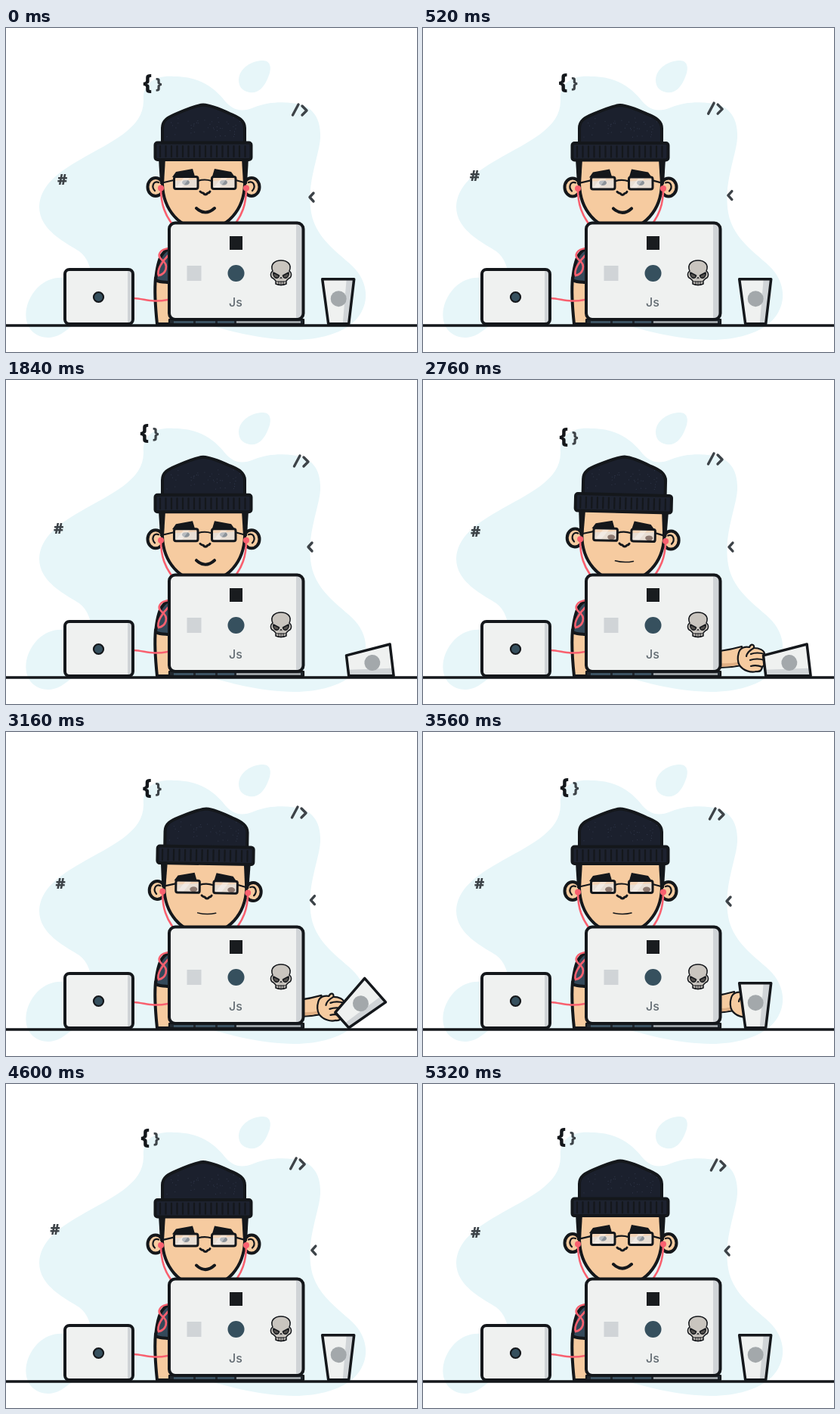
Animation of 544 by 428 pixels, one loop 5360 ms. Source, as an HTML page:

```html
<!DOCTYPE html>
<html lang="en">
<head>
<meta charset="utf-8">
<title>Coder at a desk</title>
<style>
  html, body { margin: 0; width: 100%; height: 100%; overflow: hidden; background: #fff; }
  svg { display: block; width: 544px; height: 428px; }
  text { font: 800 20px "Open Sans", "Noto Sans", sans-serif; fill: #3d4348; }
  .ink { stroke: #14171b; stroke-width: 4; stroke-linejoin: round; stroke-linecap: round; }
  .line { fill: none; }
  .thin { stroke-width: 2.2; }
  .cord { fill: none; stroke: #f9606f; stroke-width: 2.6; stroke-linecap: round; }
  .skin { fill: #f6cba0; }
  .metal { fill: #eff1f0; }
  .shade { fill: #d0d4d7; }
  .teal { fill: #36505e; }
  .mark { fill: none; stroke: #3d4348; stroke-width: 3.4; stroke-linecap: round; stroke-linejoin: round; }
</style>
</head>
<body>
<svg viewBox="0 0 544 428">
  <g fill="#e7f6f9">
    <path d="M182 96C180 72 199 62 222 64C256 64 274 78 287 93C299 109 311 112 328 105C350 96 375 97 393 102C416 111 419 137 414 159C407 190 399 213 404 244C410 278 440 297 458 314C479 334 482 361 466 382C449 404 412 412 382 412C336 411 304 402 270 393H106C119 342 116 309 97 295C76 282 44 266 44 236C45 208 70 190 98 174C139 150 182 133 182 96Z"/>
    <path d="M78 330C52 327 32 347 27 371C23 394 37 409 56 409C77 408 79 395 100 388L108 340Z"/>
    <path d="M308 68C309 53 325 43 340 43C351 43 352 54 347 65C342 78 334 87 322 85C312 83 308 77 308 68Z"/>
  </g>

  <g id="braces">
    <text x="181" y="81" style="font-size:28px;fill:#14171b">{</text>
    <text x="198" y="80">}</text>
  </g>
  <text id="hash" x="68" y="207">#</text>
  <path id="tag" class="mark" d="M379.500 115L387 101M392 103L398 109L392 115"/>
  <path id="angle" class="mark" d="M407 218L402 223.500L407 229"/>

  <!-- body -->
  <path class="ink skin" d="M198 330C196 350 198 372 200 391H230V330Z"/>
  <path class="ink" fill="#34495a" d="M225 289C207 291 201 302 198 333C205 337 217 336 230 335V288Z"/>
  <path class="cord" d="M216 291C204 292 199 300 206 306C217 314 211 325 202 327C199 320 207 308 215 300"/>

  <!-- head -->
  <g id="head">
    <g id="ear" class="ink">
      <ellipse class="skin" cx="198" cy="210" rx="10.500" ry="12"/>
      <path class="line thin" d="M202 204C195 201 192 210 197 215"/>
    </g>
    <use href="#ear" class="mirror"/>
    <path class="ink skin" d="M207 172V206C208 240 230 266 261.500 266C293 266 315 240 316 206V172Z"/>
    <g id="side">
      <path fill="#14171b" d="M202 172H211L209 206H204Z"/>
      <path class="cord" d="M205 212C205 232 210 248 224 264"/>
      <circle cx="205" cy="211.500" r="4" fill="#f9606f"/>
    </g>
    <use href="#side" class="mirror"/>
    <g id="brow"><path fill="#14171b" d="M220 197L225 190L247 186L250 196Z"/></g>
    <use href="#brow" class="mirror"/>

    <g id="lens">
      <rect x="222.500" y="196.500" width="31.500" height="16" rx="2.500" fill="#e8ded4"/>
      <ellipse class="pupil" cx="238" cy="204" rx="5" ry="3.500"/>
      <path fill="#f3d3b6" d="M224 198H253V200L224 202Z"/>
      <path fill="#fff" opacity=".38" d="M224 212L235 198H243L232 212Z"/>
      <rect class="ink line" x="222.500" y="196.500" width="31.500" height="16" rx="2.500" stroke-width="3" style="stroke-width:3"/>
    </g>
    <use href="#lens" x="50"/>
    <path class="ink line thin" d="M254 202Q263 199 272 202M222 201L209 204M304 201L315 204"/>
    <path class="ink line" style="stroke-width:3" d="M257 216Q259 218 261 218Q264 222 267 218Q269 218 270 216"/>
    <path id="mouth" class="ink line"/>

    <path class="ink" fill="#1b202d" d="M207 155V132C207 122 214 118 226 113C240 107 252 102 261 101.500C271 102 283 107 296 113C309 118 316 123 316 132V155Z"/>
    <g id="specks" fill="#30374a"></g>
    <rect class="ink" x="197.500" y="151.500" width="127" height="22.500" rx="3" fill="#1d222f"/>
    <path id="ribs" class="ink thin"/>
  </g>

  <!-- reaching arm -->
  <g id="arm" class="ink thin">
    <path class="skin" d="M320 362L393 358Q408 356 422 352V377Q407 380 393 380L320 382Z"/>
    <path fill="#dfae83" stroke="none" d="M320 376L393 374Q408 375 420 372V376Q407 379 393 379L320 381Z"/>
    <path class="skin" d="M418 360C420 353 427 352 432 353C434 348 439 349 438 354C445 354 452 357 452 362Q455 366 452 370Q454 376 449 379Q448 386 441 385C434 387 424 384 419 377Q415 370 418 360Z"/>
    <path class="line" d="M452 362Q442 359 434 362M452 370Q442 367 433 370M449 379Q441 376 434 378M438 354Q429 359 428 365"/>
  </g>

  <!-- cup -->
  <g id="cup">
    <path class="metal" d="M418 331H460L453 390H426Z"/>
    <path class="shade" d="M450 331H460L453 390H445Z"/>
    <circle cx="439.500" cy="357" r="10.500" fill="#a3a8ab"/>
    <path class="ink line" style="stroke-width:3.500" d="M418 331H460L453 390H426Z"/>
  </g>

  <!-- small laptop -->
  <path class="cord" d="M169 357C185 358 193 363 214 359"/>
  <rect class="metal" x="78" y="319" width="90" height="72" rx="6"/>
  <path class="shade" d="M161 320H163Q167 320 167 325V390H161Z"/>
  <rect class="ink line" x="78" y="319" width="90" height="72" rx="6"/>
  <circle class="ink teal thin" cx="122.500" cy="355.500" r="6.500"/>

  <!-- main laptop -->
  <path class="ink thin" fill="#20272e" d="M216 385H394V391H216Z"/>
  <path stroke="#3d5362" stroke-width="3" stroke-dasharray="26 3" d="M222 388.500H302"/>
  <path stroke="#aeb3b6" stroke-width="2.500" d="M305 388.500H390"/>
  <rect class="metal" x="216" y="257.500" width="177.500" height="127.500" rx="8"/>
  <path class="shade" d="M384 259H387Q392 260 392 266V378Q391 383 384 383Z"/>
  <rect class="ink line" x="216" y="257.500" width="177.500" height="127.500" rx="8"/>
  <rect x="296" y="275" width="17" height="18" fill="#191c1f"/>
  <rect x="239.500" y="314" width="19" height="20" class="shade"/>
  <circle class="teal" cx="304.500" cy="324" r="11"/>
  <text x="304" y="368" text-anchor="middle" style="font:500 16px Inter,sans-serif;fill:#626b72">Js</text>
  <g class="ink" style="stroke-width:1.500">
    <path fill="#c9c5bf" d="M353 321C349 312 356 307 364 307C372 307 379 312 375 321C379 324 378 330 374 331L371 334V338Q364 341 357 338V334L354 331C350 330 349 324 353 321Z"/>
    <g id="socket"><path fill="#55524f" d="M354 323L361.500 327Q361 331 357 330Q353 328 354 323Z"/></g>
    <use href="#socket" transform="translate(728 0) scale(-1 1)"/>
    <path class="line" stroke-width="1" d="M363 331L364 329L365 331M358 335H370M361 335V339M364 335V340M367 335V339"/>
  </g>

  <path stroke="#14171b" stroke-width="3.600" d="M0 393H544"/>
</svg>
<script>
const LOOP = 5360, STEP = 40, DRIFT = 3600, NOD = 595;
const el = id => document.getElementById(id);
const set = (id, name, value) => el(id).setAttribute(name, value);
const move = (id, x, y) => set(id, "transform", `translate(${x} ${y})`);
const clamp = u => Math.max(0, Math.min(1, u));
const linear = (t, from, to) => clamp((t - from) / (to - from));
const ease = (t, from, to) => {
  const u = linear(t, from, to);
  return u * u * (3 - 2 * u);
};

// Symbols drift through three offsets, one per quarter turn, and back home.
function drift(id, turn, ...stops) {
  const path = [[0, 0], ...stops, [0, 0]];
  const i = Math.floor(turn * 4), u = ease(turn * 4, i, i + 1);
  const [x, y] = path[i].map((v, axis) => v + (path[i + 1][axis] - v) * u);
  move(id, x, y);
}

function buildHat() {
  let ribs = "", specks = "", seed = 7;
  const rand = () => (seed = seed * 16807 % 2147483647) / 2147483647;
  for (let x = 204; x < 323; x += 7.5) ribs += `M${x} 156V170`;
  for (let i = 0; i < 45; i++)
    specks += `<circle cx="${213 + rand() * 97}" cy="${117 + rand() * 29}" r=".6"/>`;
  set("ribs", "d", ribs);
  el("specks").innerHTML = specks;
}

function draw(t) {
  const turn = t % DRIFT / DRIFT;
  drift("braces", turn, [-3, -2], [-4, -3], [-1, 2]);
  drift("hash", turn, [-10, -8], [-5, -4], [-5, 0]);
  drift("tag", turn, [-3, -3], [2, -1], [-2, -4]);
  drift("angle", turn, [3, -4], [-2, -3], [3, -3]);

  const calm = ease(t, 2200, 2400) - ease(t, 3400, 3600);
  const nod = 2.8 * Math.sin(Math.PI * t / NOD) ** 2 * (1 - calm);
  const tilt = 1.4 * (ease(t, 2280, 2680) - ease(t, 3000, 3440));
  set("head", "transform", `translate(0 ${nod}) rotate(${tilt} 261 340)`);

  const look = ease(t, 2160, 2360) - ease(t, 3960, 4160);
  const pupil = document.querySelector(".pupil");
  pupil.setAttribute("transform", `translate(${8 * look} ${4 * look})`);
  pupil.setAttribute("fill", look > .5 ? "#8d7970" : "#8b9299");
  const lip = 238 + look;
  set("mouth", "d", `M252 ${lip}Q264 ${249 - 7 * look} 276 ${lip}`);
  el("mouth").style.strokeWidth = 4 - 2.5 * look;

  const reach = ease(t, 2280, 2720) - ease(t, 3960, 4240);
  const lift = ease(t, 2840, 3520);
  move("arm", -90 * (1 - reach) - 10 * lift, 6 * (1 - reach) - 9 * lift);

  const fall = linear(t, 580, 860) ** 2, hop = linear(t, 860, 1080);
  const angle = 83.2 * (fall - ease(t, 2840, 3560)) - 31 * hop * (1 - hop);
  set("cup", "transform", `translate(.7 .7) rotate(${angle} 453 390)`);
}

buildHat();
for (const copy of document.querySelectorAll(".mirror"))
  copy.setAttribute("transform", "translate(523 0) scale(-1 1)");

const start = performance.now();
function tick() {
  const t = (performance.now() - start) % LOOP;
  draw(Math.floor(t / STEP) * STEP);
  requestAnimationFrame(tick);
}
tick();
</script>
</body>
</html>
```
